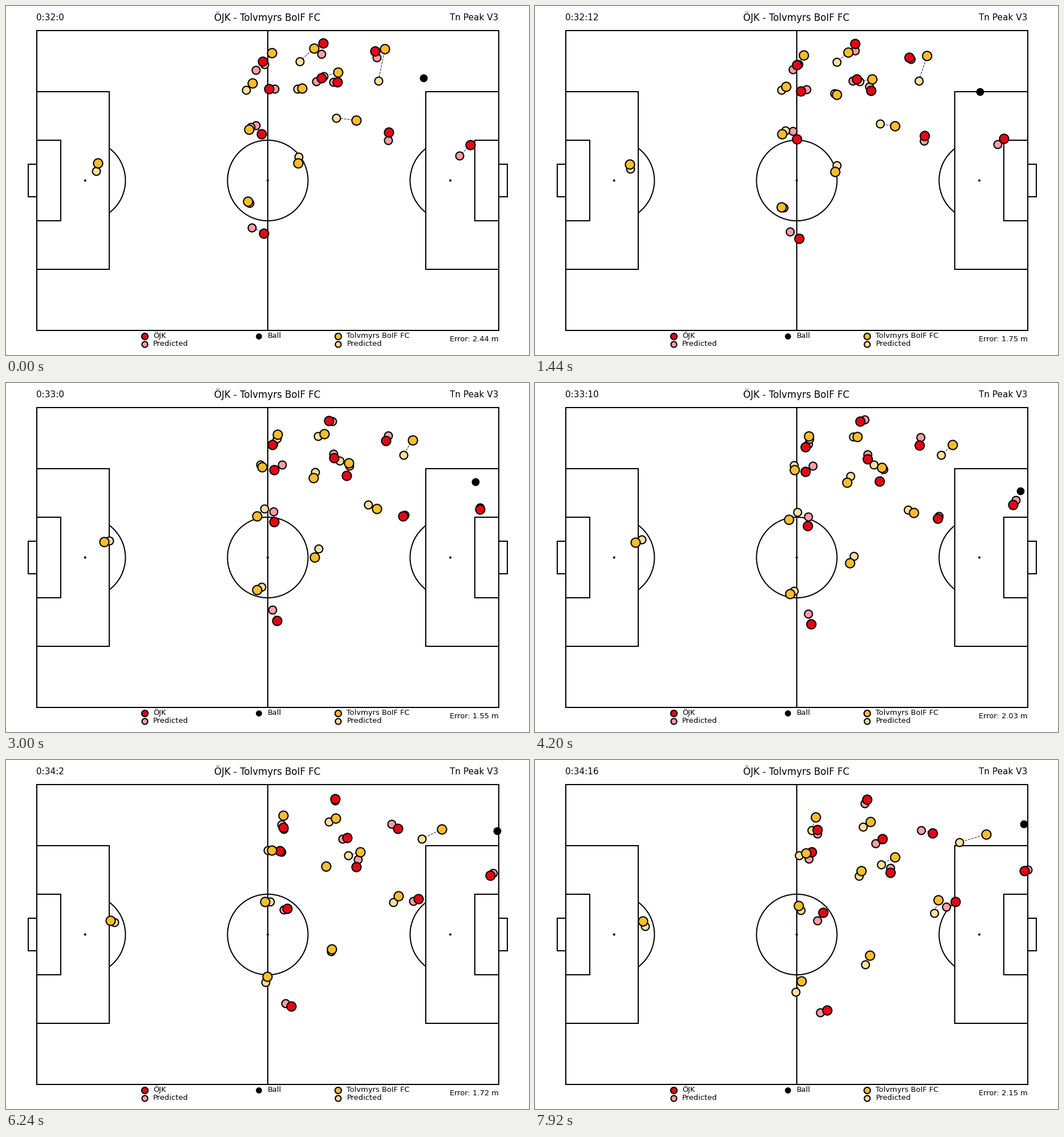
Write a matplotlib script that moves like this. It is 917x611 px and loops after 8000 ms.

```python
import numpy as np
import matplotlib.pyplot as plt
from matplotlib.animation import FuncAnimation
from matplotlib.collections import LineCollection
from matplotlib.patches import Arc, Circle, Rectangle

W, H, DPI = 917, 611, 100
STEPS, HOLD, TICK = 67, 3, 40          # each step is held for three ticks
M = 810 / 105                          # pixels per metre
CX, CY = 458.95, 305.5
NUDGE = np.array([-0.6, -0.4])         # marker centres within their pixel
HOME, AWAY = "ÖJK", "Tolvmyrs BoIF FC"
RED, PINK, GOLD, CREAM = "#e60414", "#ff9da7", "#fbbd2c", "#fde09a"

# Each player: first position, total move, first and last gap to the guess.
HOME_RUNS = [
    [(557, 65), (26, 4), (-3, 19), (-4, 7)],
    [(648, 79.5), (50, 49), (3, 10.5), (-20, -5.5)],
    [(451, 97.5), (45, 24.5), (-12.5, 14.5), (0, 7.5)],
    [(462, 145.5), (24, 16), (10, 0), (-5, 11.5)],
    [(554, 126), (56, 12), (-9.5, 6.5), (-12, 8.5)],
    [(582, 133.5), (42, 64), (-7.5, 0), (0, -8.5)],
    [(672, 221), (66, 27), (-1.5, 14.5), (-16.5, 9)],
    [(815, 243.5), (44, -49), (-19, 19), (6, -2.5)],
    [(449, 224), (56.5, 43.5), (-10.5, -15), (-9.5, 14)],
    [(453, 398), (60, 40), (-21, -10), (-12, 4.5)],
]
AWAY_RUNS = [
    [(467, 82.5), (25.5, 18), (-13, 19.5), (-6.5, 22.5)],
    [(540.5, 74), (48, 34), (-24.5, 23.5), (-13, 9.5)],
    [(665, 75), (127, 55.5), (-11.5, 56.5), (-47, 14)],
    [(433, 135), (43, 28.5), (-11.5, 12.5), (-12, 4)],
    [(583, 116.5), (49, 53.5), (-25.5, 7), (-24.5, 13.5)],
    [(520, 144), (52.5, 50), (-8, 1), (-3.5, 9)],
    [(615, 200.5), (93, 45), (-35, -4), (-7.5, 22.5)],
    [(427, 216), (35.5, 39), (2.5, -4), (4.5, 8.5)],
    [(513, 275.5), (74.5, 66.5), (1, -11.5), (-7.5, 16)],
    [(161.5, 275.5), (28.5, 7), (-3, 13.5), (3.5, 8.5)],
    [(424.5, 342), (43.5, 45), (3.5, 3), (-10.5, 19)],
]

u = np.linspace(0, 1, STEPS)[:, None]
# Even pace along the pitch, slowing a little across it.
pace = np.hstack([u, u + 0.3 * u * (1 - u)])
# All guesses swing up and to the right halfway, then fall back.
swing = np.sin(np.pi * u) ** 2 * [11, -16]


def tracks(runs):
    """True and guessed positions, indexed by player, step and axis."""
    start, move, gap0, gap1 = np.array(runs)[:, :, None].transpose(1, 0, 2, 3)
    true = start + move * pace + NUDGE
    return true, true + gap0 + (gap1 - gap0) * u + swing


home, home_guess = tracks(HOME_RUNS)
away, away_guess = tracks(AWAY_RUNS)
actual = np.concatenate([home, away])
guessed = np.concatenate([home_guess, away_guess])


def ball_at(n):
    """Slows down out of play, then reappears at once for the restart."""
    if n < 48:
        t = n / 42
        return 733 + 136 * t * (1.3 - 0.3 * t), 126.5 + 73 * t * (1.2 - 0.2 * t)
    t = (n - 52) / 14
    return 862 - 4 * t, 124 - 12 * t


ball = np.array([ball_at(n) for n in range(STEPS)]) + NUDGE
error = np.interp(range(STEPS), [0, 12, 25, 35, 42, 52, 66],
                  [2.44, 1.75, 1.55, 2.03, 1.78, 1.72, 2.15])

plt.rcParams["font.family"] = "DejaVu Sans"
fig = plt.figure(figsize=(W / DPI, H / DPI), dpi=DPI, facecolor="white")
ax = fig.add_axes([0, 0, 1, 1])
ax.set(xlim=(0, W), ylim=(H, 0))
ax.axis("off")
PEN = dict(ec="black", lw=1.44, zorder=1)


def box(x0, x1, half):
    """Rectangle centred on the pitch axis, in metres from the left goal line."""
    left = CX - 52.5 * M
    ax.add_patch(Rectangle((left + x0 * M, CY - half * M), (x1 - x0) * M,
                           2 * half * M, fill=False, **PEN))


def arc(x, a0, a1):
    ax.add_patch(Arc((x, CY), 18.3 * M, 18.3 * M, theta1=a0, theta2=a1, **PEN))


box(0, 105, 34)
for depth, half in ((16.53, 20.16), (5.5, 9.16), (-2, 3.66)):
    box(min(0, depth), max(0, depth), half)
    box(105 - max(0, depth), 105 - min(0, depth), half)
ax.plot([CX, CX], [CY - 34 * M, CY + 34 * M], color="black", lw=1.44, zorder=1)
spot = 41.5 * M
bend = np.degrees(np.arccos(5.5 / 9.15))
arc(CX, 0, 360)
arc(CX - spot, -bend, bend)
arc(CX + spot, 180 - bend, 180 + bend)
for x in (CX - spot, CX, CX + spot):
    ax.add_patch(Circle((x, CY), 2, color="black", lw=0, zorder=1))


def dots(color, size, z, at=()):
    return ax.scatter(*np.array(at).reshape(-1, 2).T, s=size ** 2, c=color,
                      edgecolors="black", linewidths=1.5, zorder=z)


def label(x, y, text, size, ha="left"):
    return ax.text(x, y, text, fontsize=size, ha=ha, va="baseline", color="black")


links = LineCollection([], colors="#333333", linewidths=0.8, linestyles="--", zorder=2)
ax.add_collection(links)
layers = [
    (dots(PINK, 10, 3), home_guess),
    (dots(CREAM, 10, 4), away_guess),
    (dots(RED, 11.6, 5), home),
    (dots(GOLD, 11.6, 6), away),
    (dots("black", 8.4, 7), ball[None]),
]

for x, name, strong, pale in ((242.9, HOME, RED, PINK), (582.4, AWAY, GOLD, CREAM)):
    dots(strong, 8, 3, (x, 578))
    dots(pale, 7.3, 3, (x, 592))
    label(x + 15, 581, name, 9.4)
    label(x + 15, 595, "Predicted", 9.4)
dots("black", 6.2, 3, (442.9, 578))
label(458.5, 581, "Ball", 9.4)

label(458.5, 26, f"{HOME} - {AWAY}", 12, "center")
label(863.5, 25, "Tn Peak V3", 11, "right")
clock = label(53.5, 25, "", 11)
score = label(863.5, 587, "", 9.4, "right")


def draw(tick):
    n = tick // HOLD
    for dot, track in layers:
        dot.set_offsets(track[:, n])
    links.set_segments(np.stack([actual[:, n], guessed[:, n]], 1))
    clock.set_text(f"0:{32 + n // 25}:{n % 25}")
    score.set_text(f"Error: {error[n]:.2f} m")
    return [dot for dot, _ in layers] + [links, clock, score]


anim = FuncAnimation(fig, draw, frames=STEPS * HOLD - 1, interval=TICK,
                     repeat=True, repeat_delay=0, blit=False)
plt.show()
```
